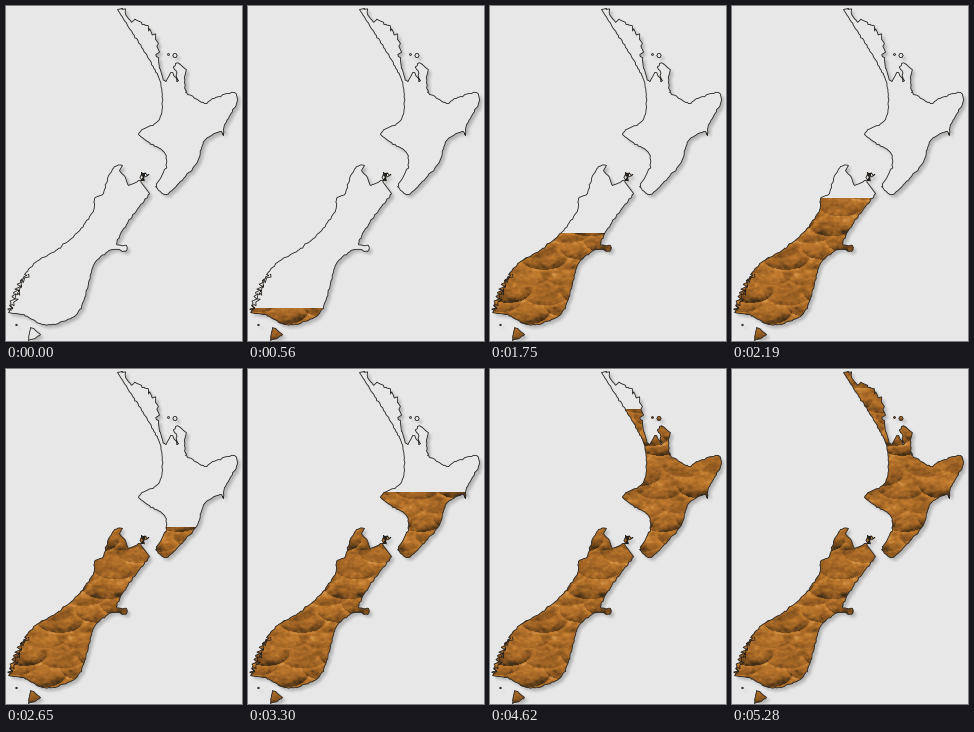
Animation of 236 by 335 pixels, one loop 5.49 s. Source, as a matplotlib script:

```python
import numpy as np
import matplotlib.pyplot as plt
from matplotlib.animation import FuncAnimation
from matplotlib.patches import PathPatch
from matplotlib.path import Path

W, H = 236, 335
LOOP, STEP = 5490, 30
BACK, INK = "#e7e7e7", "#24211d"
rng = np.random.default_rng(7)


def coast(*points, amp=0.4, step=2.0, bend=0.4):
    """A smooth curve through key points, shaken into a natural shore."""
    p = np.array(points, float) + 0.5
    ends = np.vstack([p[:1], p, p[-1:]])
    tangents = bend * (ends[2:] - ends[:-2])
    out = []
    for a, b, ta, tb in zip(p, p[1:], tangents, tangents[1:]):
        n = max(2, int(np.hypot(*(b - a)) / step))
        s = np.arange(n)[:, None] / n
        curve = (a * (2 * s**3 - 3 * s**2 + 1) + b * (3 * s**2 - 2 * s**3)
                 + ta * (s**3 - 2 * s**2 + s) + tb * (s**3 - s**2))
        out.append(curve + rng.normal(0, amp, (n, 2)) * (s > 0))
    return np.vstack(out + [p[-1:]])


def inlets(line, depth):
    """Push every second point of a shore inland."""
    line[1::2, 0] += depth * rng.uniform(0.4, 1.2, len(line[1::2]))
    return np.maximum(line, 0.6)


def closed(*parts):
    pts = np.vstack(parts)
    return Path(np.vstack([pts, pts[:1]]), closed=True)


def islet(x, y, r):
    a = np.linspace(0, 2 * np.pi, 7)[:-1]
    return closed(np.c_[x + r * np.cos(a), y + r * np.sin(a)])


FIORDS = np.array([(18, 268), (7, 286), (1, 304)])

south = closed(
    coast((116, 159), (108, 160), (101, 174), (97, 187), (88, 192), (87, 204),
          (72, 225), (51, 243), (29, 256), (19, 267)),
    inlets(coast(*FIORDS, amp=0.6), 5),
    coast((2, 306), (16, 308), (36, 318), (52, 317), (70, 308), (78, 292),
          (88, 257), (106, 243), (119, 245), (120, 239), (110, 237),
          (120, 218), (143, 187)),
    coast(*rng.normal((138, 171), (3, 4), (14, 2)), amp=0.5),
    coast((132, 174), (122, 179), (119, 171), (113, 164)),
)
north = closed(
    coast((111, 3), (121, 19), (136, 42), (152, 70), (156, 92), (153, 113),
          (140, 121), (132, 128), (143, 136), (158, 146), (160, 160),
          (149, 180)),
    coast((151, 182), (160, 188), (178, 171), (190, 157), (199, 133),
          (215, 125), (217, 129), (218, 118), (230, 97), (228, 86), (206, 92),
          (198, 97), (179, 86)),
    coast((179, 86), (177, 61), (169, 57), (171, 75), (165, 66), (158, 74),
          (153, 62), amp=1),
    coast((152, 54), (149, 33), (138, 18), (123, 13), (116, 2), amp=1.1),
)
stewart = closed(coast((24, 321), (34, 328), (22, 334), (24, 321), bend=0.1))
land = [south, north, stewart, islet(169, 49.5, 2.2), islet(162.5, 48.5, 1),
        islet(10.5, 319, 0.8)]
shore = Path.make_compound_path(*land)
channels = Path(coast(*(FIORDS + (4, 0)), amp=1.6, step=1.5))

yy, xx = np.mgrid[0:H, 0:W] + 0.5


def blur(a, rx, ry):
    for axis, r in ((0, ry), (1, rx)):
        k = np.hanning(2 * r + 3)[1:-1]
        a = np.apply_along_axis(np.convolve, axis, a, k / k.sum(), "same")
    return a


def soft_noise(rx, ry):
    n = blur(rng.normal(size=(H, W)), rx, ry)
    return n / n.std()


def drop_shadow():
    spots = np.c_[xx.ravel(), yy.ravel()]
    mask = np.any([p.contains_points(spots) for p in land], axis=0)
    mask = np.pad(mask.reshape(H, W), ((3, 0), (3, 0)))[:H, :W]
    out = np.zeros((H, W, 4))
    out[..., 3] = 0.22 * blur(mask.astype(float), 3, 3)
    return out


def rock():
    """Overlapping rounded lobes, darker towards their lower rims."""
    shade = 0.55 + 0.06 * soft_noise(7, 3) + 0.05 * soft_noise(2, 1)
    shade += 0.05 * soft_noise(14, 8)
    for row, y0 in enumerate(range(H, -20, -17)):
        for x0 in range(row % 2 * 19, W + 20, 38):
            x, y = rng.normal((x0, y0), 4)
            depth = rng.uniform(0.1, 0.5)
            d = np.hypot((xx - x) / 23, (yy - y) / 12)
            low = np.clip((yy - y) / 12 + 0.3, 0, 1)
            shade -= depth * low * d * (d < 1)
            shade += 0.25 * depth * np.exp(-((d - 1.1) / 0.1)**2) * (yy > y)
    levels = np.linspace(0, 1, 4)
    ramp = np.array([(66, 46, 22), (142, 88, 32), (192, 122, 46),
                     (226, 176, 104)]) / 255
    return np.dstack([np.interp(shade, levels, c) for c in ramp.T])


# The fill climbs one step per tick and pauses on the rests
TICKS = 50
RESTS = (4, 15, 25, 31, 40, 43, 46, 49)
KEY_STEPS = (0, 3, 8, 13, 14, 22, 33, 41)
KEY_TOPS = (H, 312, 261, 233, 227, 158, 80, 1)


def fill_top(ms):
    tick = int(ms * TICKS / LOOP)
    steps = tick - sum(r <= tick for r in RESTS)
    return int(round(np.interp(steps, KEY_STEPS, KEY_TOPS)))


fig = plt.figure(figsize=(W / 100, H / 100), dpi=100, facecolor=BACK)
ax = fig.add_axes([0, 0, 1, 1])
ax.axis("off")

texture = rock()
stage = dict(extent=(0, W, H, 0), aspect="auto", interpolation="nearest")
ax.imshow(drop_shadow(), zorder=1, **stage)
fill = ax.imshow(texture, zorder=3, **stage)
ax.set_xlim(0, W)
ax.set_ylim(H, 0)

ax.add_patch(PathPatch(shore, facecolor=BACK, edgecolor="none", zorder=2))
for line in (shore, channels):
    ax.add_patch(PathPatch(line, fill=False, edgecolor=INK, lw=0.6, zorder=4))
fill.set_clip_path(shore, ax.transData)


def update(i):
    top = fill_top(min((i + 1) * STEP, LOOP - 1))
    fill.set_visible(top < H)
    if top < H:
        fill.set_data(texture[top:])
        fill.set_extent((0, W, H, top))
    return [fill]


anim = FuncAnimation(fig, update, frames=LOOP // STEP, interval=STEP,
                     repeat=True, repeat_delay=0, blit=False)
plt.show()
```
